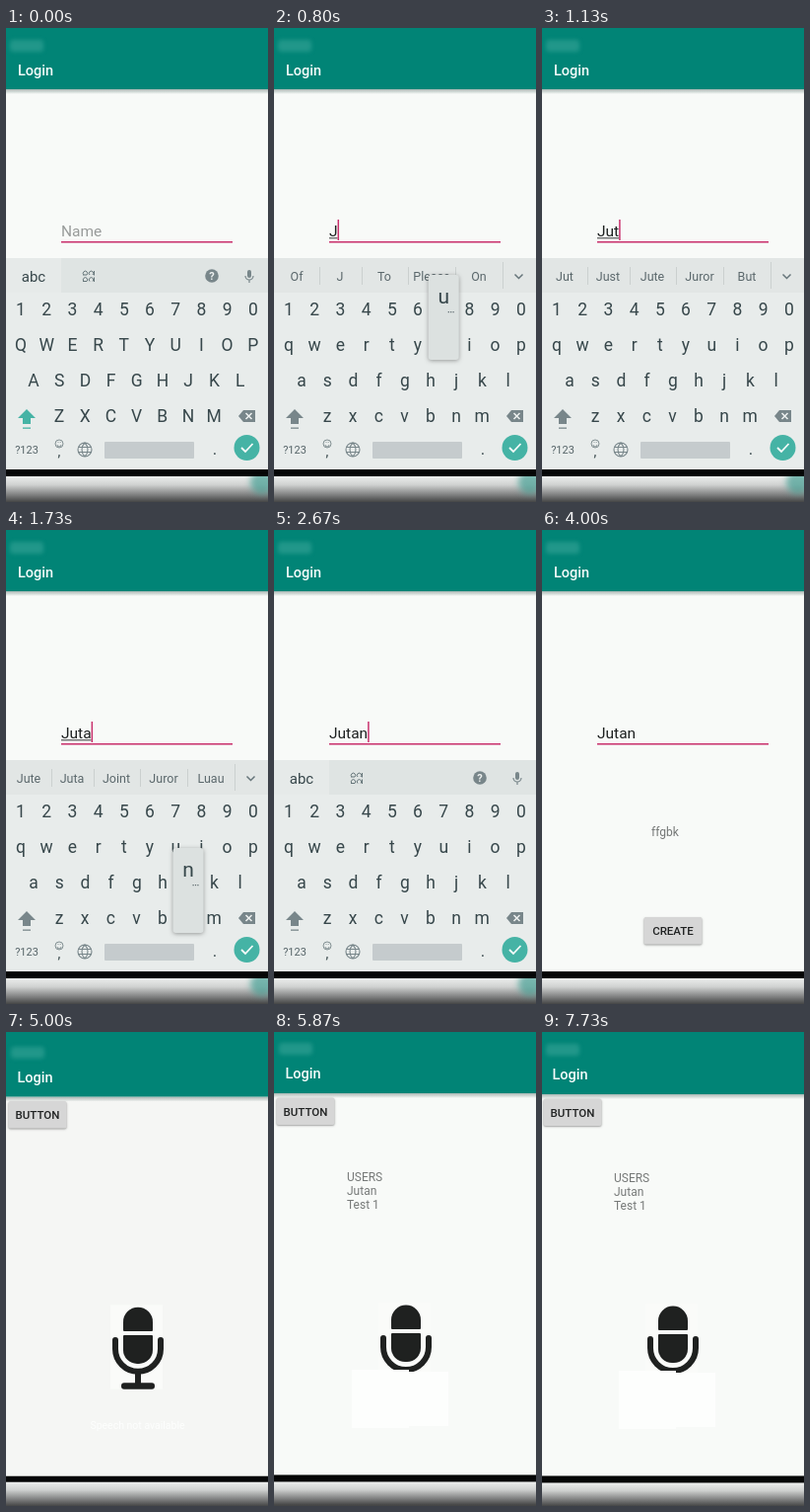
Recreate the animation shown at these times as an HTML page with a canvas. Size 266x480 px, loop 8 s.

```html
<!DOCTYPE html>
<html lang="en">
<head>
<meta charset="utf-8">
<title>Login screen</title>
<style>
html, body { margin: 0; width: 100%; height: 100%; overflow: hidden; background: #f8faf8; }
canvas { display: block; width: 266px; height: 480px; }
</style>
</head>
<body>
<canvas id="stage"></canvas>
<script>
const W = 266, H = 480, LOOP = 8000;
const canvas = document.getElementById('stage');
const ctx = canvas.getContext('2d');
const dpr = window.devicePixelRatio || 1;
canvas.width = W * dpr;
canvas.height = H * dpr;

const TEAL = '#018476', INK = '#37474b', GREY = '#78868a', PINK = '#c9306c';
const NAME = 'Jutan';
const ROWS = [
  { keys: '1234567890', x: 15, y: 285 },
  { keys: 'qwertyuiop', x: 15, y: 321 },
  { keys: 'asdfghjkl', x: 28, y: 357 },
  { keys: 'zxcvbnm', x: 54, y: 393 }
];
const KEY_STEP = 26.2;
const PRESSES = [
  { key: 'j', from: 70, to: 270 },
  { key: 'u', from: 670, to: 930 },
  { key: 't', from: 930, to: 1130 },
  { key: 'a', from: 1330, to: 1470 },
  { key: 'n', from: 1670, to: 1930 }
];
const HINTS = [
  [],
  ['Of', 'J', 'To', 'Please', 'On'],
  ['Just', 'Ju', 'Jump', 'Judge', 'Sun'],
  ['Jut', 'Just', 'Jute', 'Juror', 'But'],
  ['Jute', 'Juta', 'Joint', 'Juror', 'Luau'],
  ['Jutan', 'Juta', 'Joint', 'Titan', 'Tan']
];

const clamp = v => Math.max(0, Math.min(1, v));
const progress = (t, from, to) => clamp((t - from) / (to - from));
const easeOut = p => 1 - (1 - p) ** 3;

function box(x, y, w, h, color, r = 0) {
  ctx.fillStyle = color;
  ctx.beginPath();
  ctx.roundRect(x, y, w, h, r);
  ctx.fill();
}

function disc(x, y, r, color) {
  ctx.fillStyle = color;
  ctx.beginPath();
  ctx.arc(x, y, r, 0, 7);
  ctx.fill();
}

function label(str, x, y, size, color, align = 'left', weight = 400) {
  ctx.font = `${weight} ${size}px Roboto, sans-serif`;
  ctx.fillStyle = color;
  ctx.textAlign = align;
  ctx.fillText(str, x, y);
}

function strokePath(d, color, width = 1) {
  ctx.strokeStyle = color;
  ctx.lineWidth = width;
  ctx.stroke(new Path2D(d));
}

function fillPath(d, color) {
  ctx.fillStyle = color;
  ctx.fill(new Path2D(d));
}

function fade(y0, y1, stops) {
  const g = ctx.createLinearGradient(0, y0, 0, y1);
  stops.forEach((c, i) => g.addColorStop(i / (stops.length - 1), c));
  return g;
}

function withShadow(blur, draw) {
  ctx.save();
  ctx.shadowColor = 'rgba(0,0,0,.35)';
  ctx.shadowBlur = blur * dpr;
  ctx.shadowOffsetY = dpr;
  draw();
  ctx.restore();
}

function header(x, y, bottom) {
  box(-10, bottom, W + 20, 5, fade(bottom, bottom + 5, ['rgba(60,90,85,.42)', 'rgba(60,90,85,0)']));
  box(-10, -10, W + 20, bottom + 10, TEAL);
  ctx.save();
  ctx.filter = 'blur(2px)';
  box(4, 12, 34, 12, 'rgba(120,200,190,.28)', 3);
  ctx.restore();
  label('Login', x, y, 14.5, '#f4fbfa', 'left', 500);
}

function button(text, x, y, pressed = 0) {
  const shade = Math.round(214 - 24 * pressed);
  withShadow(2, () => box(x, y, 59, 27.5, `rgb(${shade},${shade},${shade})`, 2));
  label(text, x + 29.5, y + 18, 11.5, '#202222', 'center', 500);
}

function bottomStrip(top, bottom, keyboardShown) {
  box(-10, top, W + 20, H - top + 10, '#050606');
  box(-10, bottom, W + 20, H - bottom + 10, fade(bottom, H, ['#eceeed', '#cfd1d0', '#8a8b8b', '#454646']));
  if (!keyboardShown) return;
  ctx.save();
  ctx.beginPath();
  ctx.rect(0, bottom, W, H - bottom);
  ctx.clip();
  ctx.filter = 'blur(3px)';
  disc(260, 460, 12, 'rgba(70,160,148,.7)');
  ctx.restore();
}

function keyColumn(key) {
  const row = ROWS.find(r => r.keys.includes(key));
  return { x: row.x + row.keys.indexOf(key) * KEY_STEP, y: row.y };
}

function micGlyph(x, y) {
  box(x - 2, y - 6, 4, 8, GREY, 2);
  strokePath(`M${x - 4} ${y}a4 4 0 0 0 8 0M${x} ${y + 4}v3`, GREY, 1.2);
}

function toolbar() {
  box(0, 233, W, 35, '#dfe4e3');
  box(0, 233, 56, 35, '#e6eae9');
  label('abc', 28, 256.5, 15, INK, 'center');
  for (const y of [248, 254.5]) {
    strokePath(`M79 ${y + 2}a2.2 2.2 0 1 1 3 0h-4M85 ${y + 2}a2.2 2.2 0 1 1 3 0M89.5 ${y - 2}v4.5`, '#66767a', 1);
  }
  disc(209, 251, 6.8, GREY);
  label('?', 209, 255, 11, '#eef1f0', 'center', 700);
  micGlyph(247, 251);
}

function suggestions(words) {
  box(0, 233, W, 35, '#e2e6e5');
  words.forEach((w, i) => label(w, [23, 67, 112, 160, 208][i], 255.5, 12.5, '#5b686c', 'center'));
  for (const x of [46, 89, 136, 184]) box(x, 242, 1, 18, '#cbd0cf');
  box(232, 237, 1, 27, '#cbd0cf');
  strokePath('M244.5 249.5l4 4 4-4', '#66757a', 1.5);
}

function keyboard(count, caps, showBar, accept) {
  box(0, 233, W, 214, '#e8eceb');
  if (showBar) toolbar(); else suggestions(HINTS[count]);
  for (const row of ROWS) {
    [...row.keys].forEach((k, i) =>
      label(caps ? k.toUpperCase() : k, row.x + i * KEY_STEP, row.y + 6, 17.5, INK, 'center'));
  }
  const shift = caps ? '#45b3a5' : GREY;
  fillPath('M21 386l9 9h-5v6h-8v-6h-5z', shift);
  box(17, 404.5, 8, 1.3, shift);
  fillPath('M236 393l5-6h12v12h-12z', GREY);
  strokePath('M243.5 390l6 6m0-6l-6 6', '#eef1f0', 1.5);

  label('?123', 21, 431, 11, '#566468', 'center');
  strokePath('M58 421a4 4 0 1 1-8 0a4 4 0 1 1 8 0M52 422a2 2 0 0 0 4 0M52.6 419.5h.8M54.8 419.5h.8', GREY, .9);
  label(',', 54, 434, 14, INK, 'center');
  strokePath('M87 427a7 7 0 1 1-14 0a7 7 0 1 1 14 0M73.5 424.5h13M73.5 429.5h13M80 420c-4 4-4 10 0 14c4-4 4-10 0-14', GREY, 1.1);
  box(100, 419, 91, 17, '#c5cbcd', 1);
  label('.', 212, 432, 17, INK, 'center');
  disc(244.5, 425, 13, accept ? '#2f9588' : '#45b3a5');
  strokePath('M239 425l4 4 7.5-8', '#f4faf9', 1.8);
}

function popup(key, caps) {
  const { x, y } = keyColumn(key);
  const left = Math.max(0, Math.min(W - 31, x - 15.5));
  withShadow(4, () => box(left, y - 71, 31, 86, '#dce1e0', 3));
  label(caps ? key.toUpperCase() : key, left + 15.5, y - 42, 21, INK, 'center');
  for (let i = 0; i < 3; i++) box(left + 20 + i * 2.4, y - 34, 1.2, 1.2, '#5b686c');
}

function caretVisible(t) {
  if (t < 270) return false;
  if (t < 2270) return true;
  if (t < 2470) return false;
  if (t < 3000) return true;
  return t >= 3470 && t < 4000 || t >= 4530;
}

function loginScreen(t) {
  const count = PRESSES.filter(p => t >= p.to).length;
  const typed = NAME.slice(0, count);
  box(0, 0, W, H, '#f8faf8');
  header(12, 47.5, 62);

  label(typed || 'Name', 56, 211, 15.5, typed ? '#1d2020' : '#989b9a');
  const width = typed ? ctx.measureText(typed).width : 0;
  if (typed && t < 2470) box(56, 212.3, width, 1, '#333636');
  if (caretVisible(t)) box(56 + width, 194, 1.5, 21, PINK);
  box(56, 216, 174, 1.6, PINK);

  label('ffgbk', 125, 310, 12, '#747776', 'center');
  const press = progress(t, 4670, 4760);
  button('CREATE', 103.5, 392, press);

  const slide = progress(t, 2730, 3000);
  const shown = slide < 1;
  if (shown) {
    ctx.save();
    ctx.globalAlpha = 1 - slide * .6;
    ctx.translate(0, 214 * slide * slide);
    keyboard(count, count === 0, count === 0 || t >= 2530, t >= 2470 && t < 2670);
    const active = PRESSES.find(p => t >= p.from && t < p.to);
    if (active) popup(active.key, count === 0);
    ctx.restore();
  }
  bottomStrip(447, 454, shown);
}

function microphone() {
  const ink = '#1f2120';
  box(105, 275, 53, 86, '#fafbf9');
  box(118, 277.5, 30, 24.5, ink, [15, 15, 1, 1]);
  box(118, 306, 30, 29, ink, [1, 1, 14, 14]);
  ctx.lineCap = 'round';
  strokePath('M110 311v9a23 23 0 0 0 46 0v-9', ink, 6);
  ctx.lineCap = 'butt';
  box(130, 343, 6, 15, ink);
  box(116, 354.5, 34, 6.5, ink, 3);
}

function usersScreen(t) {
  const settle = progress(t, 5000, 5270);
  const nudge = progress(t, 7530, 7730);
  const enter = easeOut(progress(t, 4800, 5000));
  const drop = 3 * (1 - settle) + 36 * (1 - enter);

  ctx.save();
  ctx.globalAlpha = enter;
  box(0, 0, W, H, settle < 1 ? '#f5f6f4' : '#f8faf8');
  ctx.translate(1 - nudge, drop - settle * (1 - nudge));
  ctx.scale(1, (H - drop) / H);
  header(10.5, 48, 63);
  button('BUTTON', 1.5, 67.5);
  if (t >= 5200) {
    ['USERS', NAME, 'Test 1'].forEach((s, i) => label(s, 73, 151.5 + i * 14.3, 12, '#767978'));
  }
  microphone();
  if (t >= 4930 && t < 5870) label('Speech not available', 132.5, 402, 10.5, '#fdfefd', 'center');
  const cover = progress(t, 5735, 5870);
  if (cover > 0) {
    ctx.globalAlpha = cover;
    box(78, 343, 58, 59, '#fdfefd');
    box(135, 345, 41, 55, '#fdfefd');
    ctx.globalAlpha = 1;
  }
  bottomStrip(449.5, 456.5 - (1 - settle), false);
  ctx.restore();
}

function render(t) {
  ctx.setTransform(dpr, 0, 0, dpr, 0, 0);
  if (t < 5000) loginScreen(t);
  if (t >= 4800) usersScreen(t);
}

function tick(now) {
  render(now % LOOP);
  requestAnimationFrame(tick);
}
render(0);
requestAnimationFrame(tick);
</script>
</body>
</html>
```
